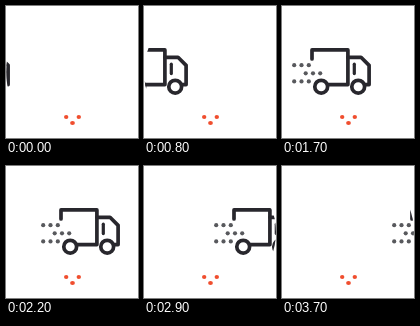
Write an HTML page that moves like this. It is 132 by 132 pixels and loops after 3.8 s.

```html
<!DOCTYPE html>
<html lang="en">
<head>
<meta charset="utf-8">
<title>Delivery truck</title>
<style>
  html, body { margin: 0; width: 100%; height: 100%; overflow: hidden; background: #fff; }
  svg { display: block; width: 100vw; height: 100vh; }
</style>
</head>
<body>
<svg viewBox="0 0 132 132">
  <clipPath id="disc"><circle cx="66" cy="66" r="66"/></clipPath>
  <g clip-path="url(#disc)">
    <g id="truck">
      <g fill="none" stroke="#28272d" stroke-width="3.7" stroke-linecap="round" stroke-linejoin="round">
        <path d="M30 53V43.9H65.9V78.6H39"/>
        <path d="M65.9 51.3H79L87.1 59.4V78.6H76"/>
        <path d="M72.3 58.2V67.6" stroke-width="3.2"/>
        <g fill="#fff">
          <circle cx="39.2" cy="80.7" r="6.4"/>
          <circle cx="76.2" cy="80.7" r="6.4"/>
        </g>
      </g>
      <g fill="#58595d">
        <circle cx="12.2" cy="59.2" r="2.1"/>
        <circle cx="19.5" cy="59.2" r="2.1"/>
        <circle cx="26.8" cy="59.2" r="2.1"/>
        <circle cx="23.7" cy="67.3" r="2.1"/>
        <circle cx="31" cy="67.3" r="2.1"/>
        <circle cx="38.2" cy="67.3" r="2.1"/>
        <circle cx="12.2" cy="75.4" r="2.1"/>
        <circle cx="19.5" cy="75.4" r="2.1"/>
        <circle cx="26.8" cy="75.4" r="2.1"/>
      </g>
    </g>
  </g>
  <g fill="#f04e2e">
    <ellipse cx="60.2" cy="111" rx="2.2" ry="2"/>
    <ellipse cx="72.8" cy="111" rx="2.2" ry="2"/>
    <ellipse cx="66.5" cy="117" rx="2.4" ry="2.1"/>
  </g>
</svg>
<script>
  const LOOP = 3800, STEP = 100, STRIDE = 5, START = -85;
  const truck = document.getElementById('truck');
  const begin = performance.now();

  function draw(now) {
    const t = Math.max(0, now - begin) % LOOP;
    const x = START + STRIDE * Math.floor(t / STEP);
    truck.setAttribute('transform', `translate(${x} 0)`);
    requestAnimationFrame(draw);
  }
  draw(begin);
</script>
</body>
</html>
```
